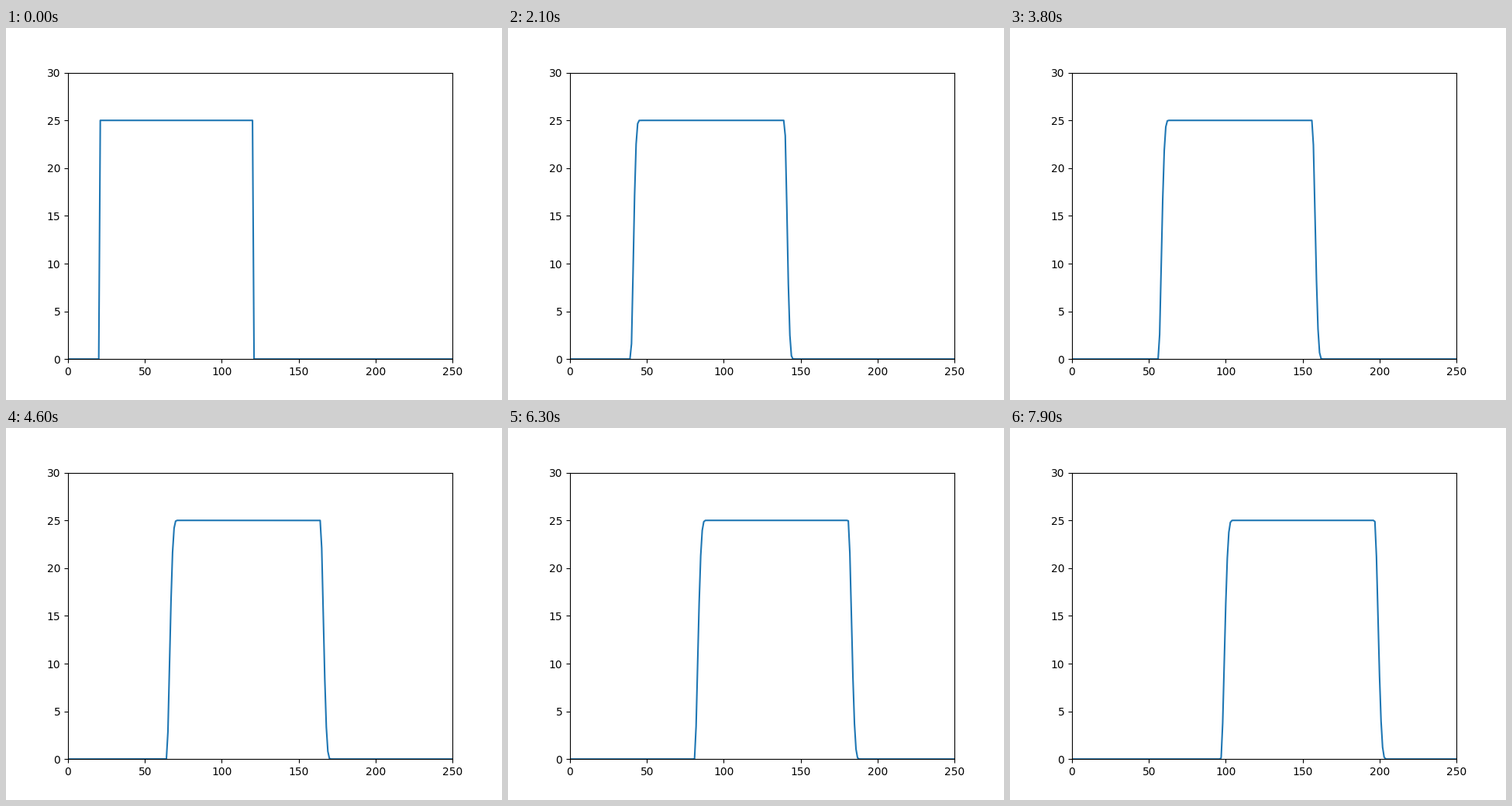
Animation, 640 px wide and 480 px high, one loop 8000 ms. Source, as a matplotlib script:

```python
import matplotlib.pyplot as plt
import numpy as np
from matplotlib.animation import FuncAnimation

FRAMES = 80
HEIGHT = 25
START, END = 20.5, 120.5  # edges of the pulse at time zero, in cells
FOOT = 1.04               # scaled distance from a front's middle to its foot
SHARPNESS = 25            # how abruptly the foot begins

x = np.arange(251)


def front(pos, width):
    """Smeared step from 0 to 1: sharp corner behind, soft shoulder ahead."""
    u = (x - pos) / width + FOOT
    s = np.logaddexp(0, SHARPNESS * u) / SHARPNESS  # smooth max(0, u)
    return 1 - np.exp(-s * (0.18 + 0.52 * s + 0.0045 * s**5))


def pulse(n):
    """Square pulse carried one cell per step, its fronts widening as n^(1/5)."""
    width = max(n ** 0.2, 0.05)
    return HEIGHT * (front(START + n, width) - front(END + n, width))


fig, ax = plt.subplots(figsize=(6.4, 4.8), dpi=100)
ax.set_xlim(0, 250)
ax.set_ylim(0, 30)
line, = ax.plot(x, pulse(0))


def update(n):
    line.set_ydata(pulse(n))
    return line,


anim = FuncAnimation(fig, update, frames=FRAMES, interval=100,
                     init_func=lambda: update(0), repeat=True, repeat_delay=0)
plt.show()
```
